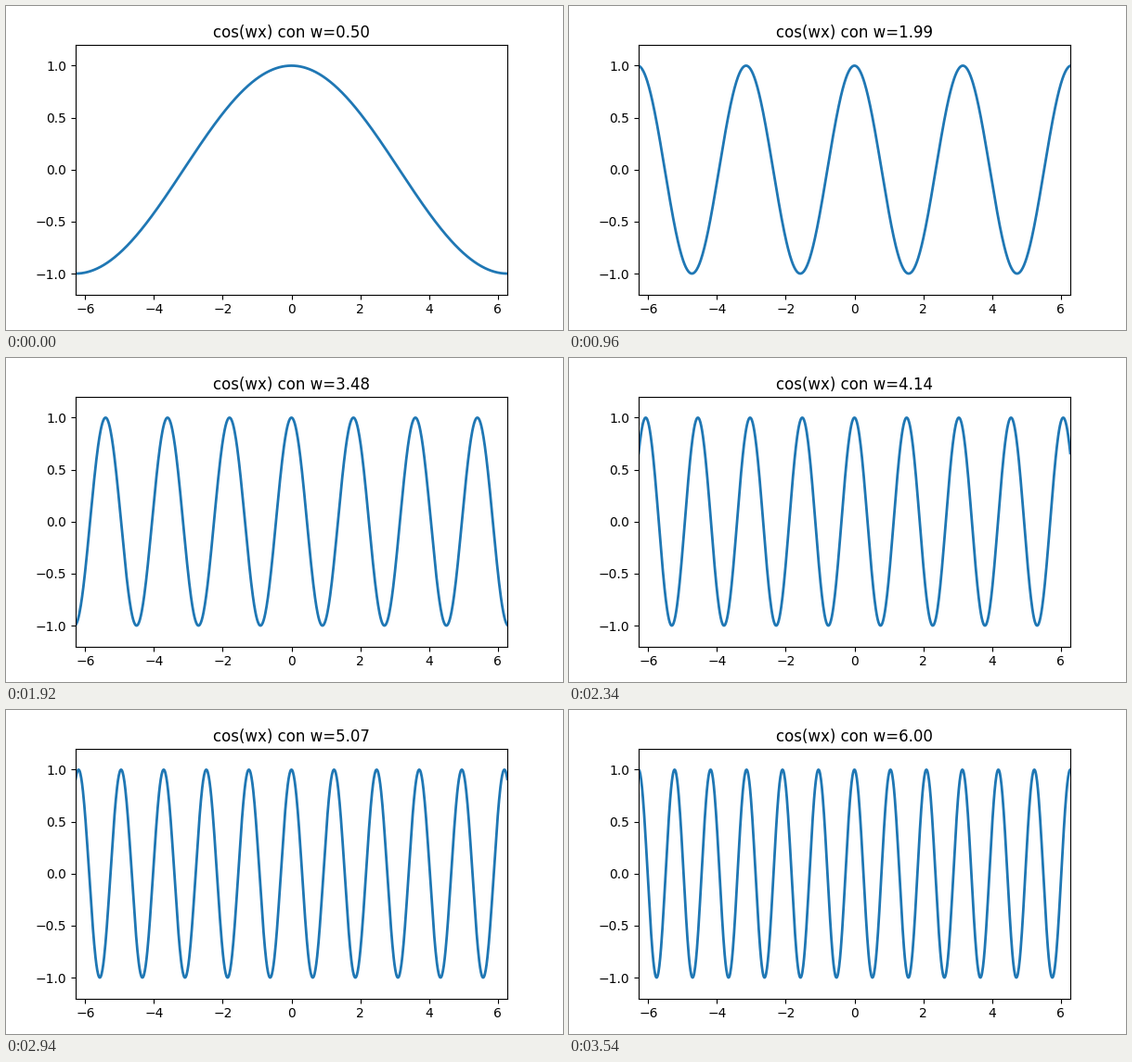
A matplotlib script that plays this animation: 600x350 px, repeating every 3.6 s.

```python
import numpy as np
import matplotlib.pyplot as plt
from matplotlib.animation import FuncAnimation

FRAMES = 60
INTERVAL = 60  # ms

x = np.linspace(-2 * np.pi, 2 * np.pi, 1000)
freqs = np.linspace(0.5, 6, FRAMES)

fig, ax = plt.subplots(figsize=(6, 3.5), dpi=100)
ax.set_xlim(-2 * np.pi, 2 * np.pi)
ax.set_ylim(-1.2, 1.2)
line, = ax.plot([], [], lw=2)
title = ax.set_title("")


def update(frame):
    w = freqs[frame]
    line.set_data(x, np.cos(w * x))
    title.set_text(f"cos(wx) con w={w:.2f}")
    return line, title


anim = FuncAnimation(fig, update, frames=FRAMES, interval=INTERVAL,
                     repeat=True, repeat_delay=0)
plt.show()
```
